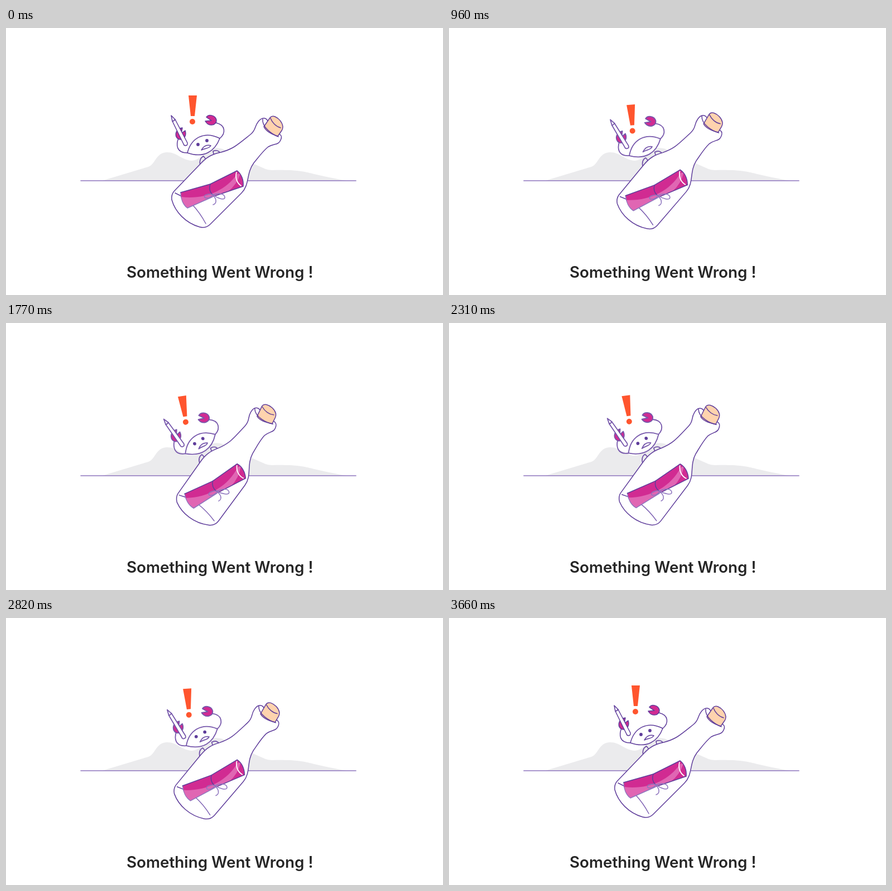
Write an HTML page with a canvas that moves like this. It is 783 px wide and 479 px high and loops after 3720 ms.

```html
<!DOCTYPE html>
<html lang="en">
<head>
<meta charset="utf-8">
<title>Something Went Wrong</title>
<style>
  html, body { margin: 0; width: 100%; height: 100%; overflow: hidden; background: #fff; }
  canvas { display: block; width: 783px; height: 479px; }
</style>
</head>
<body>
<canvas id="stage"></canvas>
<script>
const W = 783, H = 479, LOOP = 3720, STEP = 30;
const PIVOT = { x: 392, y: 253 };
const MAX_TILT = 8.8 * Math.PI / 180;
const INK = '#5f3d9b', PALE = '#8f76bf', PINK = '#d12b92', ROSE = '#e066b3';
const ORANGE = '#ff552e', CORK = '#ffd3ae', HILL = '#ebebed';

const canvas = document.getElementById('stage');
const ratio = window.devicePixelRatio || 1;
canvas.width = Math.round(W * ratio);
canvas.height = Math.round(H * ratio);
const ctx = canvas.getContext('2d');
ctx.scale(ratio, ratio);
ctx.lineCap = ctx.lineJoin = 'round';

const shape = d => new Path2D(d);

const hills = shape('M172 274 L255 249 C268 245 268 223 289 223 C307 223 314 237 333 238 C346 237 349 229 361 221 Q374 212 388 217 C408 225 427 231 440 242 L465 253 Q470 255 477 255 C522 254 536 258 552 262 Q592 271 612 274 Z');
const horizon = shape('M134 274 H627');

const bottle = shape('M301 293 L349 243 C361 230 371 226 385 223 C407 217 413 211 438 191 C449 182 444 178 452 168 Q459 159 466 163 L491 191 Q496 195 491 203 C487 210 480 207 470 213 C461 220 453 231 444 242 C430 261 437 281 422 296 L366 352 Q358 360 347 357 C322 350 303 330 297 308 Q296 299 301 293 Z');
const lip = shape('M460 163 C458 178 477 191 488 195');
const cork = shape('M462 177 L473 161 Q476 157 482 159 C489 162 495 169 496 177 Q496 181 494 184 L487 194 C474 190 465 184 462 177 Z');
const corkRim = shape('M474 162 C477 170 484 177 492 179');
const baseNear = shape('M303 296 L313 301');
const baseFar = shape('M334 317 Q348 332 358 351');

const scroll = shape('M313 295 L366 280 L414 256 C422 262 426 273 425 284 L370 303 L325 323 C317 317 313 306 313 295 Z');
const sheen = shape('M314 303 C354 308 393 293 414 262 L420 261 Q414 281 397 294 L370 304 L325 324 L313 312 Z');
const scrollTop = shape('M313 295 L366 280 L414 256 C422 262 426 273 425 284 L372 302');
const scrollBottom = shape('M370 303 L325 323 C317 317 313 306 313 295');
const fold = shape('M366 280 Q362 291 370 299');
const scrollEnd = shape('M413 259 C410 270 415 279 421 283');
const bow = shape('M371 299 C376 297 390 295 392 303 C393 311 378 305 371 299 C362 296 353 300 356 304 C361 307 369 303 371 299 M371 299 C374 306 377 305 376 312 Q375 316 371 317');

const crabBody = shape('M325 224 C332 197 355 184 383 198 C374 222 354 234 325 224 Z');
const leftArm = shape('M309 198 C305 208 304 224 325 224');
const rightArm = shape('M376 170 C394 174 394 189 383 198');
const mouth = shape('M350 219 C354 212 360 209 367 211 C364 217 357 215 350 219 Z');
const legs = shape('M348 246 C346 238 349 232 354 230 Q357 233 358 237 M371 221 Q380 217 385 226 M371 221 L372 226');
const rightClaw = shape('M357 167 L368 166 L359 160 C363 154 375 156 377 165 C378 175 363 178 357 167 Z');
const leftClaw = shape('M316 179 L314 189 L321 184 C324 193 319 200 312 200 C301 199 301 181 316 179 Z');
const pen = shape('M296 157 L303 164 L325 206 Q326 211 321 211 Q319 211 318 208 L298 167 Z');
const penTip = shape('M298 167 Q301 167 303 164');
const markBar = shape('M327 121 L342 121 L338 158 L331 158 Z');

function fill(path, color) {
  ctx.fillStyle = color;
  ctx.fill(path);
}

function stroke(path, color = INK, width = 1.5) {
  ctx.strokeStyle = color;
  ctx.lineWidth = width;
  ctx.stroke(path);
}

function dot(x, y, r, color) {
  ctx.fillStyle = color;
  ctx.beginPath();
  ctx.arc(x, y, r, 0, Math.PI * 2);
  ctx.fill();
}

const clamp = v => Math.max(0, Math.min(1, v));
const ease = v => (1 - Math.cos(Math.PI * clamp(v))) / 2;
const swing = t => t < 1950 ? ease(t / 1950) : ease((3690 - t) / 1740);
const pulse = (t, center, half) => ease(1 - Math.abs(t - center) / half);

function drawScenery() {
  fill(hills, HILL);
  stroke(horizon, PALE, 1.6);
  ctx.fillStyle = '#262626';
  ctx.font = '600 27.8px Inter, sans-serif';
  ctx.fillText('Something Went Wrong !', 216, 448);
}

function drawCrab(t, moving) {
  const color = moving ? '#7657ab' : INK;
  const width = moving ? 1.8 : 1.5;
  const line = path => stroke(path, color, width);
  const solid = (path, paint) => { fill(path, paint); line(path); };

  line(legs);
  line(leftArm);
  line(rightArm);
  solid(crabBody, '#fff');
  solid(rightClaw, PINK);
  solid(leftClaw, PINK);
  solid(pen, '#fff');
  line(penTip);
  line(mouth);
  if (Math.abs(t - 960) > 75) {
    dot(344, 209, 2.9, INK);
    dot(360, 202, 2.9, INK);
  }
}

function drawMark(t) {
  ctx.save();
  ctx.translate(0, 12 * (pulse(t, 960, 220) + pulse(t, 3000, 220)));
  fill(markBar, ORANGE);
  dot(334, 168, 5, ORANGE);
  ctx.restore();
}

function drawScroll() {
  fill(scroll, PINK);
  ctx.save();
  ctx.clip(scroll);
  fill(sheen, ROSE);
  ctx.restore();
  stroke(scrollBottom, PALE);
  stroke(scrollTop);
  stroke(fold);
  stroke(scrollEnd, '#fff', 1.8);
  stroke(bow, PALE);
}

function drawBottle() {
  fill(bottle, '#fff');
  stroke(bottle);
  fill(cork, CORK);
  stroke(cork);
  stroke(corkRim);
  stroke(lip);
  stroke(baseNear);
  stroke(baseFar, '#7e62b3');
  drawScroll();
}

function draw(now) {
  const t = Math.min(Math.floor(now % LOOP / STEP) * STEP, 3660);
  const tilt = MAX_TILT * swing(t);
  ctx.fillStyle = '#fff';
  ctx.fillRect(0, 0, W, H);
  drawScenery();
  ctx.save();
  ctx.translate(PIVOT.x, PIVOT.y);
  ctx.rotate(-tilt);
  ctx.translate(-PIVOT.x, -PIVOT.y);
  drawCrab(t, tilt > 0.003);
  drawMark(t);
  drawBottle();
  ctx.restore();
}

let start;
function tick(now) {
  start ??= now;
  draw(now - start);
  requestAnimationFrame(tick);
}
draw(0);
requestAnimationFrame(tick);
</script>
</body>
</html>
```
